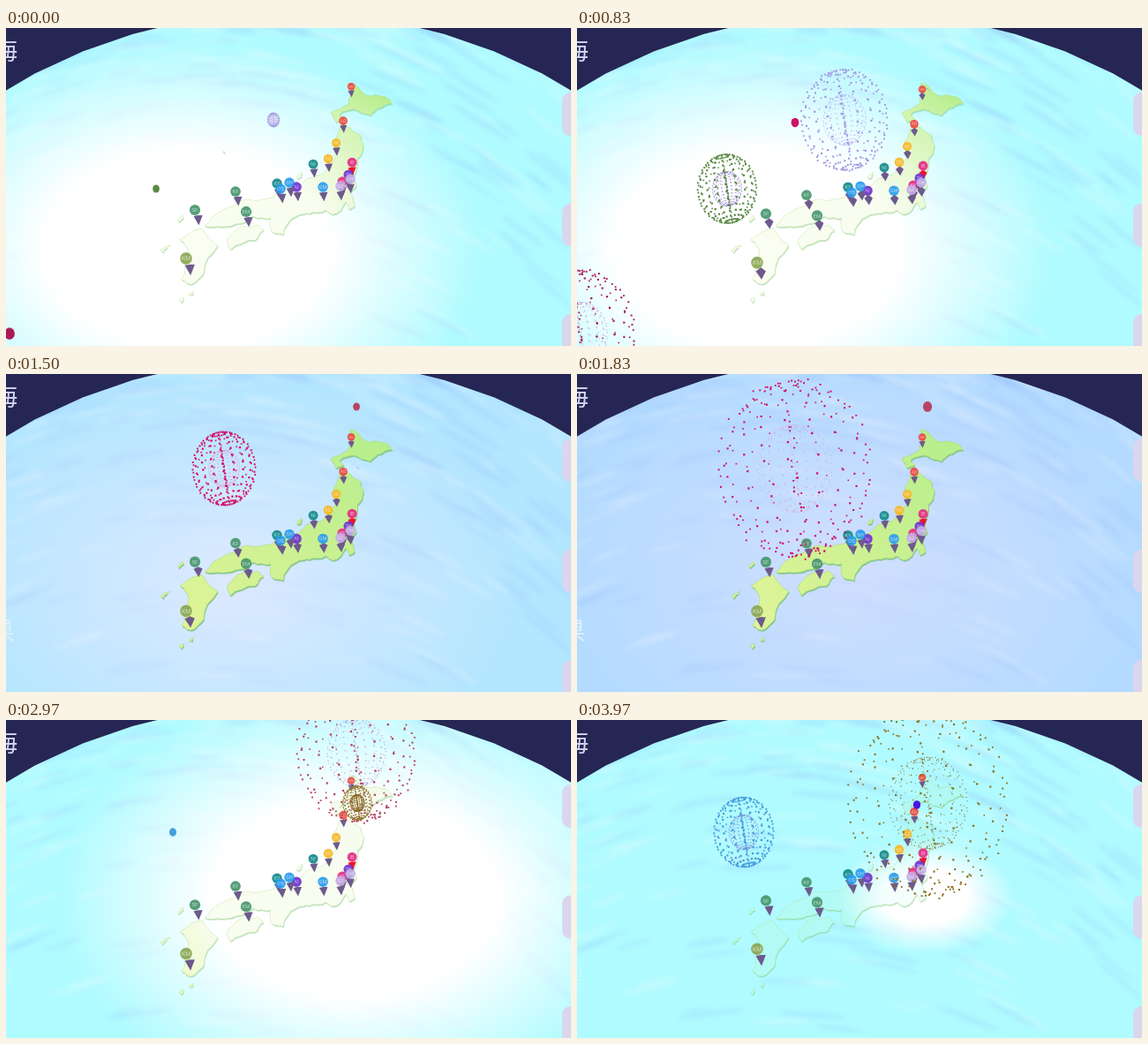
Animation of 640x360 px, one loop 4070 ms. Source, as an HTML page with a canvas:

```html
<!DOCTYPE html>
<html lang="ja">
<head>
<meta charset="utf-8">
<style>
html, body { margin: 0; width: 100%; height: 100%; overflow: hidden; background: #262654; }
canvas { display: block; }
</style>
</head>
<body>
<canvas id="stage" width="640" height="360"></canvas>
<script>
const LOOP = 4070, TAU = Math.PI * 2, W = 640, H = 360;
const ctx = document.getElementById('stage').getContext('2d');

let seed = 7;
const rnd = () => (seed = (seed * 16807) % 2147483647) / 2147483647;
const clamp = v => Math.max(0, Math.min(1, v));
const smooth = v => (v = clamp(v), v * v * (3 - 2 * v));
const mix = (a, b, f) => a + (b - a) * f;
const mixColor = (a, b, f) => a.map((n, i) => Math.round(mix(n, b[i], f)));
const rgba = (c, a) => `rgba(${c},${a})`;

function ellipse(x, y, rx, ry, angle = 0) {
  ctx.beginPath();
  ctx.ellipse(x, y, rx, ry, angle, 0, TAU);
  ctx.fill();
}

// a rough shoreline: every side is split in half twice, each time pushed off its line
function coast(text) {
  let pts = text.match(/\d+ \d+/g).map(p => p.split(' ').map(Number));
  for (let pass = 0; pass < 2; pass++) {
    pts = pts.flatMap((p, i) => {
      const q = pts[(i + 1) % pts.length], push = (rnd() - .5) * .3;
      const dx = q[0] - p[0], dy = q[1] - p[1];
      return [p, [p[0] + dx / 2 - dy * push, p[1] + dy / 2 + dx * push]];
    });
  }
  return new Path2D('M' + pts.join('L') + 'Z');
}

const LAND = new Path2D();
for (const shore of [
  '389 63, 402 71, 414 77, 430 78, 438 86, 421 91, 413 99, 394 92, 378 98, 383 103, 374 107, 368 96, 388 86',
  `380 108, 390 113, 402 122, 405 133, 398 148, 394 168, 397 178, 390 187, 395 201, 388 205, 385 197,
   370 211, 362 206, 344 210, 329 213, 314 234, 302 231, 300 215, 280 213, 266 221, 245 225, 225 224,
   240 210, 263 197, 303 192, 317 180, 334 178, 364 160, 373 142, 371 130, 377 118`,
  '256 234, 285 223, 292 229, 282 240, 254 251, 250 243',
  '197 240, 222 227, 240 246, 224 278, 210 290, 199 285, 207 256',
  '329 170, 336 163, 334 169', '196 308, 201 305, 199 311', '195 220, 200 212, 201 215',
  '175 252, 186 246, 178 254', '207 302, 212 298, 211 302'
]) LAND.addPath(coast(shore));

const landFill = ctx.createLinearGradient(200, 290, 430, 70);
landFill.addColorStop(0, '#e0f498');
landFill.addColorStop(1, '#b6ee8c');

const GLOBE = new Path2D();
for (let a = -156; a <= -24; a += 5.5) {
  const r = a * Math.PI / 180;
  GLOBE.lineTo(320 + 622 * Math.cos(r), 603.3 + 622 * Math.sin(r));
}
GLOBE.lineTo(W + 300, H + 40);
GLOBE.lineTo(-300, H + 40);

// soft ripples on the water, denser near the horizon
const waves = document.createElement('canvas');
waves.width = W;
waves.height = H;
{
  const w = waves.getContext('2d');
  w.filter = 'blur(2.5px)';
  for (let i = 0; i < 240; i++) {
    const x = rnd() * W, y = rnd() ** 2 * H;
    w.fillStyle = i % 2 ? 'rgba(140,175,245,.16)' : 'rgba(255,255,255,.18)';
    w.beginPath();
    w.ellipse(x, y, 14 + rnd() * 28, 1.5 + rnd() * 2.5, (x - 230) / 550, 0, TAU);
    w.fill();
  }
}

// colour: places
const PINS = Object.entries({
  '#ee4640': 'HK 391 67, AO 382 106',
  '#f7b828': 'AK 374 131, YG 365 149',
  '#158a8c': 'NI 348 155, KY 307 177',
  '#e42d84': 'IB 392 153, KN 381 175',
  '#7035d0': 'TK 388 167, AI 329 181',
  '#c4ade6': 'CH 390 172, SZ 379 180',
  '#2a9cee': 'GM 359 181, SH 321 176, OS 311 183',
  '#46966e': 'KF 260 186, EM 272 209, SF 214 207',
  '#8aa652': 'KM 204 262'
}).flatMap(([color, places]) => places.split(', ').map(place => {
  const [label, x, y] = place.split(' ');
  return { color, label, x: +x, y: +y };
}));

// a burst starts at t0, reaches `size` after `grow` ms and then fades
const BURSTS = [
  { x: 303, y: 104, t0: -550, grow: 1456, size: 62, color: '#a49ae2', inner: '#b8aef0' },
  { x: 170, y: 182, t0: -20, grow: 1190, size: 95, color: '#5b8a45', inner: '#9484d0' },
  { x: 4, y: 346, t0: -400, grow: 1380, size: 95, color: '#aa1c58', inner: '#c08ad0' },
  { x: 247, y: 107, t0: 599, grow: 1231, size: 95, color: '#d01068', inner: '#dba2d2' },
  { x: 397, y: 37, t0: 1411, grow: 1698, size: 95, color: '#b84462', inner: '#a89ade' },
  { x: 398, y: 94, t0: 1850, grow: 2120, size: 100, color: '#8f7328', inner: '#866420' },
  { x: 189, y: 127, t0: 2750, grow: 1700, size: 95, color: '#469edc', inner: '#8394dc' },
  { x: 385, y: 96, t0: 3700, grow: 1800, size: 95, color: '#4a16e2', inner: '#8060e8' }
];
const FUSE = 700;

// tilted sphere of dots with a dotted axis and a little scatter
const DOTS = [];
function addDot(x, y, z) {
  const y2 = y * .97 - z * .24, z2 = y * .24 + z * .97;
  DOTS.push({ x: x * .98 + y2 * .17, y: y2 * .98 - x * .17, z: z2, jx: rnd() - .5, jy: rnd() - .5 });
}
for (let i = 1; i < 15; i++) {
  const v = i / 15 * Math.PI;
  for (let j = 0; j < 18; j++) {
    const u = j / 18 * TAU + .2;
    addDot(Math.sin(v) * Math.cos(u), Math.cos(v), Math.sin(v) * Math.sin(u));
  }
  addDot(0, (i - 7.5) / 11, 0);
}

// the light drifts from south-west to north-east, dims half way and shrinks at the end
function lightAt(t) {
  const power = clamp(Math.abs(t - 1830) / 1000);
  const drift = smooth((t - 1000) / 1500), end = smooth((t - 3000) / 950);
  return {
    power,
    sea: mixColor([180, 219, 255], [176, 251, 255], power),
    x: mix(205, 395, drift),
    y: mix(250, 200, drift),
    rx: mix(335, 100, end),
    ry: mix(235, 65, end),
    color: mixColor([224, 224, 255], [255, 255, 255], power),
    alpha: mix(.65, 1, power),
    core: .48 * clamp((power - .6) / .4),
    wash: .9 * end
  };
}

function drawGlow(l, strength) {
  ctx.save();
  ctx.translate(l.x, l.y);
  ctx.scale(l.rx, l.ry);
  const g = ctx.createRadialGradient(0, 0, 0, 0, 0, 1), a = l.alpha * strength;
  g.addColorStop(0, rgba(l.color, a));
  g.addColorStop(l.core, rgba(l.color, a));
  g.addColorStop(1, rgba(l.color, 0));
  ctx.fillStyle = g;
  ctx.fillRect(-1, -1, 2, 2);
  ctx.restore();
}

function drawGlobe(l) {
  ctx.save();
  ctx.clip(GLOBE);
  ctx.fillStyle = rgba(l.sea, 1);
  ctx.fillRect(0, 0, W, H);
  ctx.drawImage(waves, 0, 0);
  drawGlow(l, 1);

  ctx.save();
  ctx.translate(.8, 1.8);
  ctx.fillStyle = `rgba(125,195,130,${.85 - .9 * l.core})`;
  ctx.fill(LAND);
  ctx.restore();

  ctx.fillStyle = landFill;
  ctx.fill(LAND);
  ctx.strokeStyle = 'rgba(165,215,115,.5)';
  ctx.stroke(LAND);
  ctx.clip(LAND);
  ctx.fillStyle = rgba(l.sea, l.wash);
  ctx.fillRect(0, 0, W, H);
  drawGlow(l, l.core * 1.8);
  ctx.restore();
}

function drawPins(t) {
  const bob = 1.3 + 5.2 * Math.cos((t - 1800) / 5500 * TAU);
  const peak = 4.5 * Math.exp(-(((t - 1050) / 500) ** 2));
  ctx.textAlign = 'center';
  ctx.textBaseline = 'middle';
  ctx.font = '6px Roboto, sans-serif';
  for (const { x, y, color, label } of PINS) {
    const lean = (390 - x) * .02, scale = (3.5 + y * .0125) / 6;
    ctx.save();
    ctx.translate(x, y + bob * (.6 + y * .0015));
    ctx.scale(scale, scale);
    ctx.fillStyle = label === 'IB' ? '#ee1230' : '#6d5a8c';
    ctx.beginPath();
    ctx.moveTo(lean - 5, 7 + peak * .5);
    ctx.lineTo(lean, 6 - peak * .3);
    ctx.lineTo(lean + 5, 6 + peak * .7);
    ctx.lineTo(lean + .8, 17);
    ctx.fill();
    ctx.globalAlpha = .92;
    ctx.fillStyle = color;
    ellipse(0, 0, 6, 6);
    ctx.fillStyle = 'rgba(255,255,255,.65)';
    ctx.fillText(label, 0, .4);
    ctx.restore();
  }
}

function drawShell(b, r, color, size) {
  const scatter = Math.max(0, r - 45) * .16;
  ctx.fillStyle = color;
  for (const d of DOTS) {
    const s = size * (1 + d.z * .25);
    ctx.fillRect(b.x + d.x * r * .86 + d.jx * scatter - s / 2, b.y + d.y * r + d.jy * scatter - s / 2, s, s);
  }
}

function drawBurst(b, t) {
  const age = t - b.t0, q = age / b.grow;
  if (age < -FUSE || q > 1.12) return;
  if (age < 0) {
    const y = b.y + 45 * (age / FUSE) ** 2;
    ctx.fillStyle = '#9ab0dc';
    for (let i = 0; i < 3; i++) ctx.fillRect(b.x + i - 1, y + i * i / 2, 1, 1);
    return;
  }
  const r = 4.5 + b.size * q ** 3;
  ctx.globalAlpha = 1 - clamp((q - 1) / .12);
  if (r < 7) {
    ctx.fillStyle = b.color;
    ellipse(b.x, b.y, r * .86, r);
  } else {
    ctx.fillStyle = `rgba(255,255,255,${.8 * clamp((22 - r) / 10)})`;
    ellipse(b.x, b.y, r * .86, r);
    const size = Math.min(1.9, .6 + r / 28);
    if (r > 16) drawShell(b, r * .5, b.inner, 1);
    drawShell(b, r, b.color, size);
  }
  ctx.globalAlpha = 1;
}

function drawText(l) {
  ctx.textAlign = 'right';
  ctx.textBaseline = 'middle';
  ctx.font = '300 28px "Noto Sans CJK JP", "Noto Sans CJK", sans-serif';
  ctx.fillStyle = '#d5d6f2';
  ctx.fillText('海', 13, 25);
  ctx.fillStyle = `rgba(255,255,255,${.55 - .4 * l.power})`;
  ctx.fillText('県', 10, 290);
}

function drawButtons() {
  ctx.fillStyle = '#dad6ee';
  for (let i = 0; i < 3; i++) {
    ctx.beginPath();
    ctx.roundRect(630, 73 + i * 125.5, 50, 49, 9);
    ctx.fill();
  }
}

function drawFrame(t) {
  const light = lightAt(t);
  ctx.fillStyle = '#262654';
  ctx.fillRect(0, 0, W, H);
  drawGlobe(light);
  drawText(light);
  drawPins(t);
  for (const b of BURSTS) drawBurst(b, t);
  drawButtons();
}

const start = performance.now();
function tick() {
  drawFrame((performance.now() - start) % LOOP);
  requestAnimationFrame(tick);
}
tick();
</script>
</body>
</html>
```
